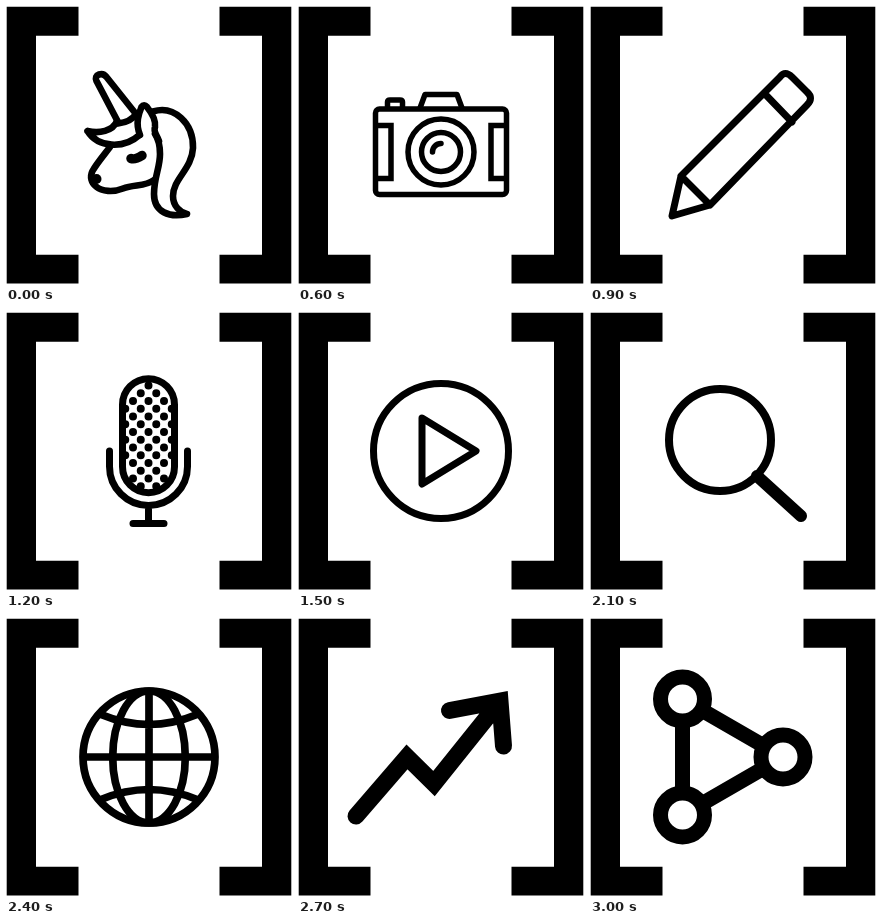
An HTML page for the animation above (3300 ms loop, 286x278 px).

```html
<!DOCTYPE html>
<html lang="en">
<head>
<meta charset="utf-8">
<title>Icons in brackets</title>
<style>
  html, body { margin: 0; height: 100%; overflow: hidden; background: #fff; }
  svg { display: block; width: 100vw; height: 100vh; }
  .icon { display: none; fill: none; stroke: #000; }
  .icon.on { display: inline; }
  .round { stroke-linecap: round; stroke-linejoin: round; }
  .solid { fill: #000; stroke: none; }
  .mesh { stroke-width: 8; stroke-dasharray: 0 15.5; }
</style>
</head>
<body>
<svg viewBox="0 0 286 278">
  <path d="M.7.7H72.500V29.700H30V248.700H72.500V277.500H.7ZM213.500.7H285.300V277.500H213.500V248.700H256V29.700H213.500Z"/>

  <!-- unicorn -->
  <g class="icon round" stroke-width="6.600">
    <path d="M112 116L90.500 75Q88.500 70 93 68.500Q97.500 67 100.500 71L130 108Q125 116 112 117.500"/>
    <path d="M81.500 125C93 128 107 125 111 115M81.500 125C92 142 118 143 133.500 129"/>
    <path d="M134 129C129 117 133 107 135.500 101Q138 97.500 141 101C145 106 150 114 149 121C147 126 151 129 153 135"/>
    <path d="M147 105.500C168 99 187.500 117 187 142C186 163 167 173 167 190C167 200 174 206.500 181 208C163 212 148 206 148 188C148 171 154 162 154 148C154 139 153 134 149 128"/>
    <path d="M104 141C98 149 91 157 86.500 165C83.500 171 85.500 177 90 180.500C96 185.500 107 186.500 117 182.500C128 178 139 181 148 174"/>
    <circle class="solid" cx="90.500" cy="173" r="5"/>
    <path d="M125 152.500Q129 154 136 149.500" stroke-width="9.500"/>
  </g>

  <!-- eye -->
  <g class="icon round" stroke-width="8">
    <path d="M52 138.500C98 70 187 70 233 138.500C187 207 98 207 52 138.500Z"/>
    <circle cx="142.500" cy="138.500" r="32"/>
    <circle class="solid" cx="142.500" cy="138.500" r="15"/>
  </g>

  <!-- camera -->
  <g class="icon round" stroke-width="5.500">
    <rect x="77.500" y="103" width="131" height="85.500" rx="4"/>
    <path d="M78 119.500H93V172.500H78M208 119.500H193V172.500H208" stroke-linejoin="miter"/>
    <path d="M122 102L127 88.500H159L164 102M89.500 102V96Q89.500 94 92 94H102Q104.500 94 104.500 96V102"/>
    <circle cx="143" cy="146" r="33"/>
    <circle cx="143" cy="146" r="19.500"/>
    <path d="M134.500 146A8.500 8.500 0 0 1 143 137.500"/>
  </g>

  <!-- pencil -->
  <g class="icon round" stroke-width="7">
    <path d="M82 210L91 170L190 71Q195 64 202 71L217 86Q224 92 217 99L120 199ZM91 170L120 199M174 87L202 116"/>
  </g>

  <!-- microphone -->
  <g class="icon round" stroke-width="7">
    <rect x="116.500" y="66.700" width="52" height="114" rx="26"/>
    <path class="mesh" d="M119.250 96.750V152M127 89V168M134.750 81.250V176M142.500 73.500V176M150.250 81.250V176M158 89V168M165.750 96.750V152"/>
    <path d="M103.500 139V154.500A39 39 0 0 0 181.500 154.500V139M142.500 194V211.500M127 211.500H158"/>
  </g>

  <!-- play -->
  <g class="icon round" stroke-width="7">
    <circle cx="143" cy="139" r="67.500"/>
    <path d="M124 106L178 139L124 172Z"/>
  </g>

  <!-- code window -->
  <g class="icon" stroke-width="5">
    <rect x="77.500" y="75.500" width="130.500" height="126.500" stroke-linejoin="round"/>
    <path d="M77 102.500H208"/>
    <g stroke-width="4">
      <circle cx="103.500" cy="90" r="6.200"/>
      <circle cx="124.500" cy="90" r="6.200"/>
      <circle cx="145.500" cy="90" r="6.200"/>
      <path class="round" d="M160 86.500H182M187 86.500H191"/>
    </g>
    <path d="M126.500 134L110.500 148.500L126.500 163M161 134L177 148.500L161 163" stroke-width="8"/>
    <path class="round" d="M150 137L137 161" stroke-width="8"/>
  </g>

  <!-- magnifier -->
  <g class="icon round" stroke-width="8">
    <circle cx="130" cy="128" r="51"/>
    <path d="M167 164L211 204" stroke-width="12"/>
  </g>

  <!-- globe -->
  <g class="icon" stroke-width="7.700">
    <circle cx="143" cy="139" r="66"/>
    <ellipse cx="143" cy="139" rx="36.300" ry="66"/>
    <path d="M143 70V208M74 139H212M95 96.500Q143 116.500 191 96.500M95 181.500Q143 161.500 191 181.500"/>
  </g>

  <!-- rising arrow -->
  <g class="icon" stroke-width="17" stroke-linecap="round">
    <path d="M58 198L109 139L136 165.500L199 87M151.500 92.500L202 83L205.500 128"/>
  </g>

  <!-- network -->
  <g class="icon" stroke-width="15">
    <path d="M92.500 81V197L193 139Z"/>
    <g fill="#fff">
      <circle cx="92.500" cy="81" r="22"/>
      <circle cx="193" cy="139" r="22"/>
      <circle cx="92.500" cy="197" r="22"/>
    </g>
  </g>
</svg>
<script>
  const STEP = 300;
  const icons = document.querySelectorAll('.icon');

  function draw() {
    const current = Math.floor(performance.now() / STEP) % icons.length;
    icons.forEach((icon, i) => icon.classList.toggle('on', i === current));
    requestAnimationFrame(draw);
  }
  draw();
</script>
</body>
</html>
```
